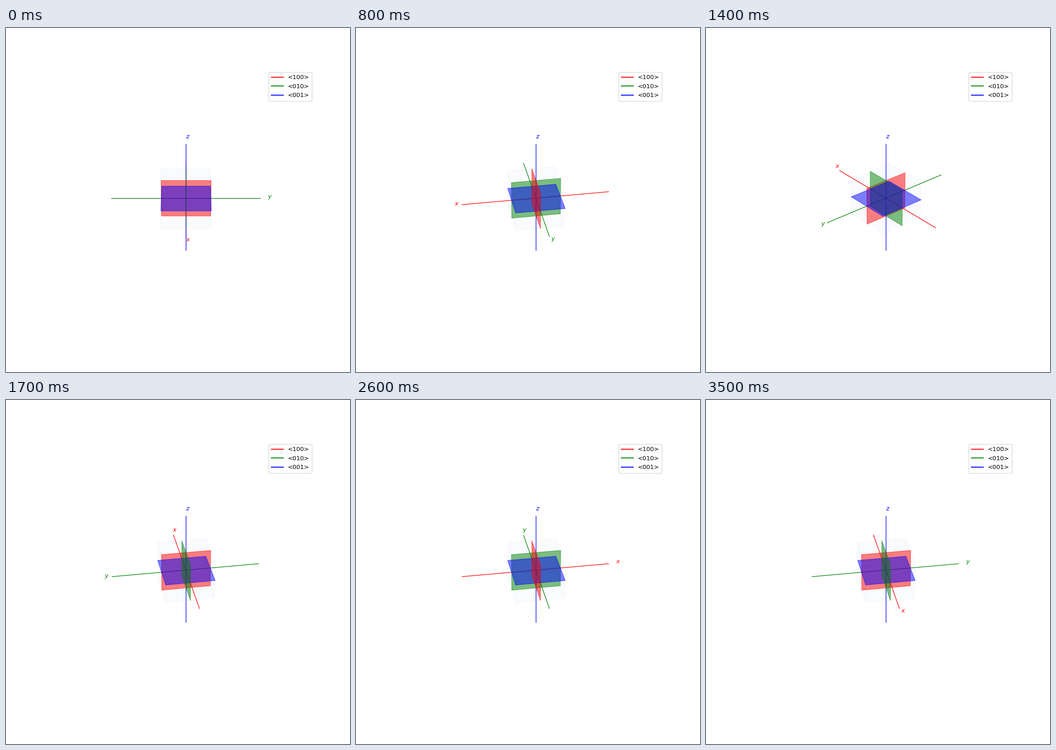
A matplotlib script for the animation above (3600 ms loop, 748 by 748 pixels).

```python
import numpy as np
import matplotlib.pyplot as plt
from matplotlib.animation import FuncAnimation
from matplotlib.colors import to_rgba
from matplotlib.lines import Line2D
from mpl_toolkits.mplot3d.art3d import Poly3DCollection

FRAMES, LOOP_MS = 36, 3600
AXIS = 3.0          # half length of each axis line
HALF = 1.0          # half edge of the cube
PAD = 25 / 24       # view margin around the data
COLORS = ("red", "green", "blue")
PLANES = ("<100>", "<010>", "<001>")

fig = plt.figure(figsize=(8, 8), dpi=93.5, facecolor="white")
ax = fig.add_subplot(projection="3d")
ax.set_axis_off()


def square(normal, offset=0.0):
    """Corners of a cube section perpendicular to the given axis."""
    corners = HALF * np.array([(-1, -1), (1, -1), (1, 1), (-1, 1)])
    return np.insert(corners, normal, offset, axis=1)


def add_faces(faces, color, alpha):
    rgba = to_rgba(color, alpha)
    ax.add_collection3d(Poly3DCollection(
        faces, facecolors=rgba, edgecolors=rgba, linewidths=1))


for k, (name, color) in enumerate(zip("xyz", COLORS)):
    tip = AXIS * np.eye(3)[k]
    ax.plot(*np.array([-tip, tip]).T, color=color, lw=1)
    ax.text(*(1.1 * tip), f"${name}$", color=color)
    add_faces([square(k)], color, 0.5)

add_faces([square(k, s * HALF) for k in range(3) for s in (-1, 1)],
          "tab:blue", 0.0125)

ax.set_xlim(-1.1 * AXIS * PAD, 1.1 * AXIS * PAD)
ax.set_ylim(-1.1 * AXIS * PAD, 1.1 * AXIS * PAD)
ax.set_zlim(-AXIS * PAD, AXIS * PAD)

handles = [Line2D([], [], color=c, lw=1.5) for c in COLORS]
ax.legend(handles, PLANES, loc="upper right")


def update(i):
    ax.view_init(elev=30, azim=360 * i / FRAMES)
    return []


anim = FuncAnimation(fig, update, frames=FRAMES, interval=LOOP_MS / FRAMES,
                     init_func=lambda: update(0), repeat=True,
                     repeat_delay=0, blit=False)
plt.show()
```
